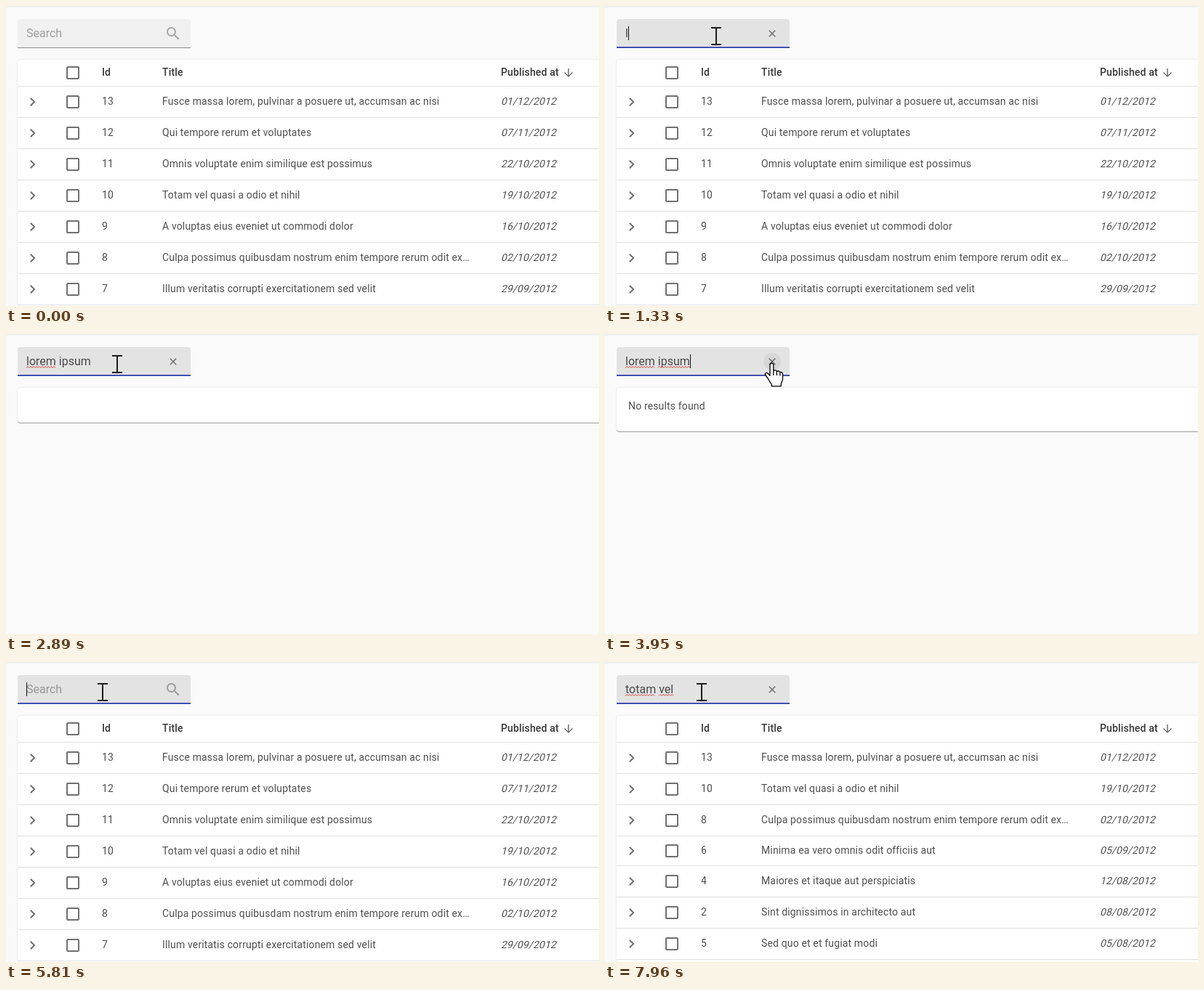
Write an HTML page that moves like this. It is 816 px wide and 413 px high and loops after 8 s.

```html
<!DOCTYPE html>
<html lang="en">
<head>
<meta charset="utf-8">
<title>List search</title>
<style>
  html, body { margin: 0; width: 100%; height: 100%; overflow: hidden; background: #fafafa; }
  svg { display: block; width: 816px; height: 413px; }
  text { font: 14px Roboto, sans-serif; letter-spacing: .15px; fill: #4f4f4f; white-space: pre; }
  .head { font-weight: 500; fill: #363636; }
  .input { font-size: 16px; letter-spacing: 0; fill: #484848; }
  .hint { fill: rgba(0,0,0,.34); }
  .icon { fill: rgba(0,0,0,.56); }
  .box { fill: none; stroke: rgba(0,0,0,.56); stroke-width: 2; }
  .mark { fill: none; stroke: #e53935; stroke-width: 1; }
  .pointer { fill: #fff; stroke: #000; stroke-width: 1.3; stroke-linejoin: round; }
  #card { fill: #fff; filter: drop-shadow(0 1px .7px rgba(0,0,0,.32)) drop-shadow(0 0 1px rgba(0,0,0,.12)); }
  #beam { mix-blend-mode: difference; fill: none; stroke: #fff; stroke-width: 2; }
</style>
</head>
<body>
<svg viewBox="0 0 816 413">
  <defs>
    <linearGradient id="shade" x2="0" y2="1">
      <stop stop-color="#ebebeb"/><stop offset="1" stop-color="#fafafa"/>
    </linearGradient>
  </defs>
  <rect width="816" height="413" fill="#fafafa"/>
  <rect width="816" height="3" fill="url(#shade)"/>

  <path id="field" d="M16 58V22a4 4 0 0 1 4-4H250a4 4 0 0 1 4 4V58z"/>
  <rect x="16" y="57" width="238" height="1" fill="#8c8c8c"/>
  <rect id="line" y="56" height="2" fill="#3f51b5"/>
  <text id="hint" class="input hint" x="28" y="43">Search</text>
  <text id="typed" class="input" x="28" y="43"></text>
  <path id="marks" class="mark"/>
  <rect id="caret" y="28" width="1" height="19" fill="#111"/>
  <path id="lens" fill="rgba(0,0,0,.3)" transform="translate(218 26)" d="M15.5 14h-.79l-.28-.27C15.41 12.59 16 11.11 16 9.5 16 5.91 13.09 3 9.5 3S3 5.91 3 9.5 5.91 16 9.5 16c1.61 0 3.09-.59 4.23-1.57l.27.28v.79l5 4.99L20.49 19l-4.99-5zm-6 0C7.01 14 5 11.99 5 9.5S7.01 5 9.5 5 14 7.01 14 9.5 11.99 14 9.5 14z"/>
  <circle id="hover" cx="230" cy="38" r="12" fill="rgba(0,0,0,.05)"/>
  <path id="clear" d="M225.8 33.8l8.4 8.4m0-8.4l-8.4 8.4" fill="none" stroke="rgba(0,0,0,.56)" stroke-width="1.3"/>

  <rect id="card" x="16" y="74" width="830" rx="4"/>
  <text id="none" x="32" y="104">No results found</text>
  <g id="full"></g>
  <g id="found"></g>

  <path id="arrow" class="pointer" d="M0 0V25.5l6-5.5 3.9 9 4-1.7L10 18.5H18z"/>
  <path id="hand" class="pointer" d="M-2.5 2.5a2.4 2.4 0 0 1 4.8 0V11c.8-1.4 4-1.6 4.6.6 1.2-1 4-.8 4.5 1.2 1.5-.8 3.6.2 3.6 2.4v6.3c0 3-1.3 5-2.2 7v3.3h-13v-2.6c-2-2-3-4.5-4.6-7.2l-4-5.6c-1.3-2.2 1.2-4 3.2-2.4l3.1 3.2zM2.3 11v6M6.9 12v5M11.4 13.5v4"/>
  <path id="beam" d="M-7 -11.5H7M0 -10.5V10.5M-7 11.5H7"/>
</svg>
<script>
const LOOP = 8000;
const FOCUS = 740, EMPTY = 2890, NONE = 3070, CLEAR = 4600, BACK = 5170, FOUND = 7640;
const BLINK = 320;
const $ = id => document.getElementById(id);
const show = (id, on) => $(id).style.display = on ? '' : 'none';
const set = (id, name, value) => $(id).setAttribute(name, value);
const clamp = v => Math.max(0, Math.min(1, v));
const ease = v => v * v * (3 - 2 * v);
const steps = (from, gap, count) => Array.from({ length: count }, (_, i) => from + gap * i);

// title, day, row height if not the usual one
const ROW = 43;
const posts = {
  13: ['Fusce massa lorem, pulvinar a posuere ut, accumsan ac nisi', '01/12'],
  12: ['Qui tempore rerum et voluptates', '07/11'],
  11: ['Omnis voluptate enim similique est possimus', '22/10'],
  10: ['Totam vel quasi a odio et nihil', '19/10'],
  9: ['A voluptas eius eveniet ut commodi dolor', '16/10'],
  8: ['Culpa possimus quibusdam nostrum enim tempore rerum odit ex…', '02/10'],
  7: ['Illum veritatis corrupti exercitationem sed velit', '29/09'],
  6: ['Minima ea vero omnis odit officiis aut', '05/09', 41],
  4: ['Maiores et itaque aut perspiciatis', '12/08'],
  2: ['Sint dignissimos in architecto aut', '08/08'],
  5: ['Sed quo et et fugiat modi', '05/08']
};

const label = (x, y, text, kind = '') => `<text class="${kind}" x="${x}" y="${y}">${text}</text>`;
const slanted = (x, y, text) => `<text transform="translate(${x} ${y}) skewX(-14)">${text}</text>`;
const checkbox = y => `<rect class="box" x="84" y="${y - 8}" width="16" height="16" rx="1"/>`;
const rule = y => `<rect x="16" y="${y}" width="800" height="1" fill="#e0e0e0"/>`;

function table(ids) {
  const head = checkbox(92) + label(132, 96, 'Id', 'head') + label(215, 96, 'Title', 'head') +
    label(681, 96, 'Published at', 'head') + rule(110) +
    '<path class="icon" transform="translate(765 83) scale(.75)" d="M20 12l-1.41-1.41L13 16.17V4h-2v12.17l-5.58-5.59L4 12l8 8 8-8z"/>';
  let bottom = 110;
  return head + ids.map(id => {
    const [title, day, height = ROW] = posts[id];
    const mid = bottom + (height + 1) / 2, base = mid + 4;
    bottom += height;
    return `<path class="icon" transform="translate(36.5 ${mid}) rotate(-90) translate(-12 -12)" d="M16.59 8.59L12 13.17 7.41 8.59 6 10l6 6 6-6z"/>` +
      checkbox(mid) + label(132, base, id) + label(215, base, title) +
      slanted(681, base, day + '/2012') + rule(bottom);
  }).join('');
}
$('full').innerHTML = table([13, 12, 11, 10, 9, 8, 7]);
$('found').innerHTML = table([13, 10, 8, 6, 4, 2, 5]);

// marks: when the spell checker underlines each word
const phrases = [
  { text: 'lorem ipsum', keys: [...steps(1330, 115, 9), 2390, 2570], marks: [1905, 3530], end: CLEAR },
  { text: 'totam vel ', keys: [...steps(6130, 127, 8), 7250, 7320], marks: [6765, 7320], end: LOOP }
];
const wakes = [FOCUS, ...phrases[0].keys, CLEAR, 4900, BACK, ...phrases[1].keys, FOUND];

// time, x, y
const path = [
  [90, 738, 356], [FOCUS, 153, 41.5], [3250, 153, 41.5], [3900, 296, 52], [3950, 229.5, 40],
  [CLEAR, 229.5, 40], [4920, 136, 45.5], [5080, 133, 41.5], [LOOP, 133, 41.5]
];

const pen = document.createElement('canvas').getContext('2d');
function width(text) {
  pen.font = '16px Roboto, sans-serif';
  return pen.measureText(text).width;
}

function squiggle(from, to) {
  let d = `M${from} 46.5`;
  for (let x = from; x + 4 <= to + 1; x += 4) d += 'l2 -2l2 2';
  return d;
}

function cursorAt(t) {
  const i = Math.max(1, path.findIndex(p => p[0] > t));
  const [t0, x0, y0] = path[i - 1], [t1, x1, y1] = path[i];
  const k = ease(clamp((t - t0) / (t1 - t0)));
  return [x0 + (x1 - x0) * k, y0 + (y1 - y0) * k];
}

function drawField(t) {
  const tone = Math.round(240 - 13 * clamp((t - FOCUS + 100) / 200));
  set('field', 'fill', `rgb(${tone},${tone},${tone})`);
  const w = 238 * (1 - (1 - clamp((t - FOCUS) / 200)) ** 3);
  set('line', 'x', 135 - w / 2);
  set('line', 'width', w);

  const phrase = phrases.find(p => t >= p.keys[0] && t < p.end);
  const typed = phrase ? phrase.text.slice(0, phrase.keys.filter(k => k <= t).length) : '';
  $('typed').textContent = typed;
  let d = '';
  if (phrase) {
    const [a, b] = phrase.text.split(' ');
    const start = 28 + width(a + ' ');
    if (t >= phrase.marks[0]) d += squiggle(28, 28 + width(a));
    if (t >= phrase.marks[1]) d += squiggle(start, start + width(b));
  }
  set('marks', 'd', d);
  show('hint', !typed);
  show('lens', !typed);
  show('clear', typed);

  const woke = wakes.filter(k => k <= t).pop();
  show('caret', woke !== undefined && Math.floor((t - woke) / BLINK) % 2 === 0);
  set('caret', 'x', Math.round(28 + width(typed)));
  return typed;
}

function drawList(t) {
  const blank = t >= EMPTY && t < BACK;
  set('card', 'height', !blank ? 400 : t < NONE ? 48 : 60);
  show('none', blank && t >= NONE);
  show('full', !blank && t < FOUND);
  show('found', t >= FOUND);
}

function drawCursor(t, typed) {
  const [x, y] = cursorAt(t);
  const inside = x > 16 && x < 254 && y > 18 && y < 58;
  const onClear = typed && Math.hypot(x - 230, y - 38) < 12;
  const kind = onClear ? 'hand' : inside ? 'beam' : 'arrow';
  for (const id of ['arrow', 'hand', 'beam']) show(id, t >= 90 && id === kind);
  set(kind, 'transform', `translate(${x} ${y})`);
  show('hover', onClear);
}

function draw(t) {
  const typed = drawField(t);
  drawList(t);
  drawCursor(t, typed);
}

const begin = performance.now();
function tick() {
  draw((performance.now() - begin) % LOOP);
  requestAnimationFrame(tick);
}
tick();
</script>
</body>
</html>
```
